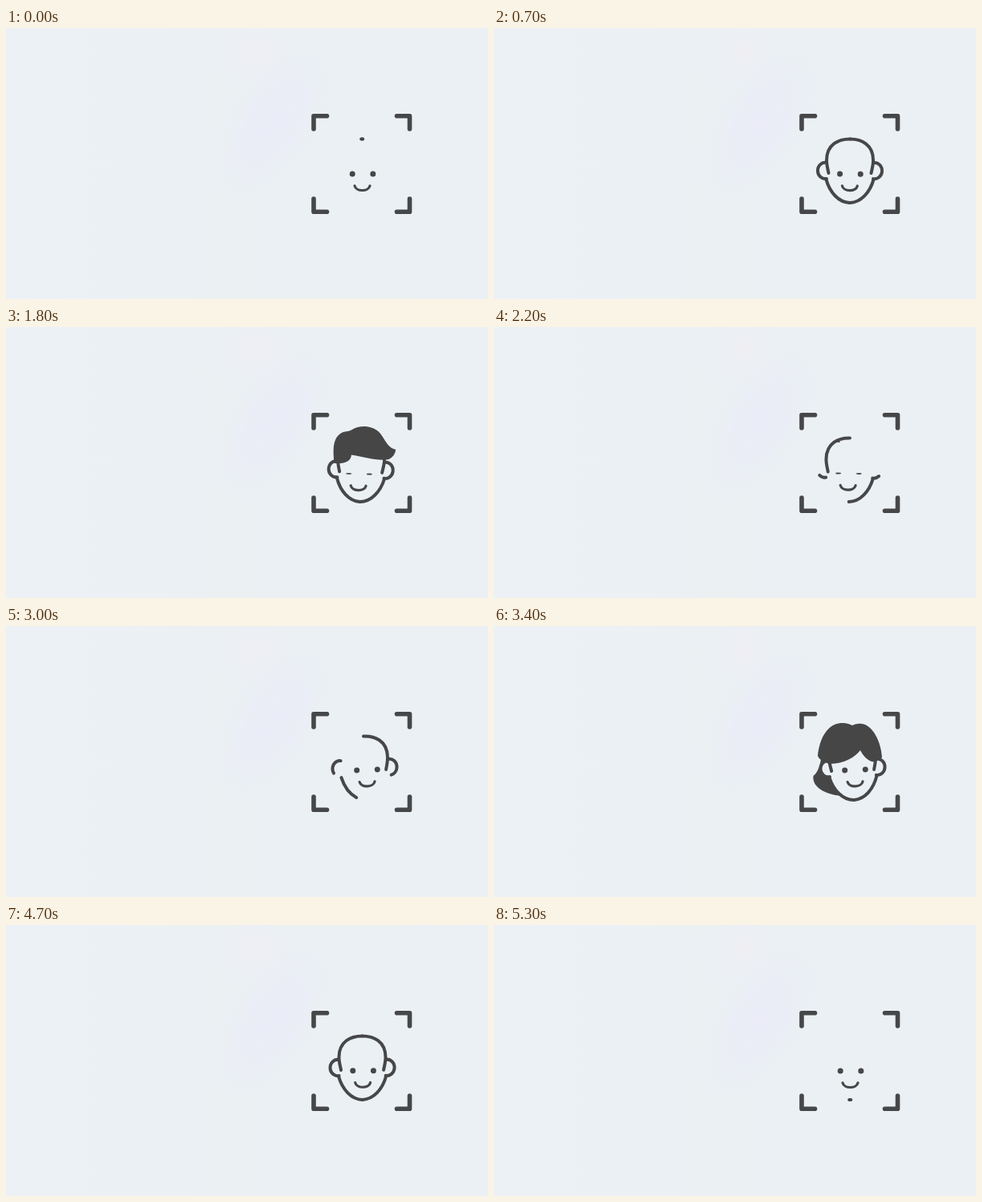
These frames come from a looping animation (600x338 px, 5400 ms). An HTML page:

```html
<!DOCTYPE html>
<html lang="en">
<head>
<meta charset="utf-8">
<title>Face scan</title>
<style>
  html, body { margin: 0; width: 100%; height: 100%; overflow: hidden; background: #ebf0f4; }
  svg { display: block; width: 100%; height: 100%; }
  .line { fill: none; stroke: #464748; stroke-linecap: round; stroke-linejoin: round; }
  .ink { fill: #464647; }
  .skin { fill: #ebf0f5; }
</style>
</head>
<body>
<svg viewBox="0 0 600 338">
  <defs>
    <linearGradient id="base" x1="0" y1="0" x2="1" y2="0">
      <stop offset="0" stop-color="#ebf1f5"/>
      <stop offset=".45" stop-color="#ebf0f3"/>
      <stop offset="1" stop-color="#ebf0f4"/>
    </linearGradient>
    <radialGradient id="lilac">
      <stop offset="0" stop-color="#ebecf8"/>
      <stop offset=".5" stop-color="#ebedf7" stop-opacity=".8"/>
      <stop offset="1" stop-color="#ebf0f5" stop-opacity="0"/>
    </radialGradient>
    <radialGradient id="rose">
      <stop offset="0" stop-color="#efeef3"/>
      <stop offset="1" stop-color="#ebf0f5" stop-opacity="0"/>
    </radialGradient>
  </defs>
  <rect width="600" height="338" fill="url(#base)"/>
  <ellipse cx="310" cy="28" rx="60" ry="60" fill="url(#rose)"/>
  <ellipse cx="332" cy="118" rx="115" ry="58" transform="rotate(-58 332 118)" fill="url(#lilac)"/>

  <path class="line" stroke-width="5.6" d="M383 126V109.8H399.5M486.5 109.8H502.5V126M383 213V229.2H399.5M486.5 229.2H502.5V213"/>

  <g id="locks">
    <path id="lockL" class="ink" d="M404 150C401 168 400 180 390 187C388 200 405 210 432 212L440 170Z"/>
    <path id="lockR" class="ink" d="M483 150C486 170 490 181 501 187C501 200 485 209 462 212L450 170Z"/>
  </g>
  <g id="head"></g>
  <path id="crop" class="ink" d="M408 171C406 152 406 137 419 131C424 129 427 130 430 128C441 121 456 122 465 130C473 138 476 151 487 153C487 158 483 164 477 166C462 168 445 162 430 160C430 167 423 172 408 171Z"/>
  <path id="bob" class="ink" d="M403 162C405 142 414 122 432 121C438 120.5 443 122 446 124C450 122 454 121.5 458 122C472 124 482 145 483 164C480 167 474 170 470 169C464 167 459 161 456 155C450 163 436 172 418 172C411 170 405 167 403 162Z"/>
  <g id="face">
    <ellipse id="eyeL" class="ink" cx="431.2" cy="182" rx="3.5"/>
    <ellipse id="eyeR" class="ink" cx="456.8" cy="182" rx="3.5"/>
    <path class="line" stroke-width="3.2" d="M434 196.8C436 204.4 451 204.4 453 196.8"/>
  </g>
</svg>
<script>
const LOOP = 5400, STEP = 100;
const $ = id => document.getElementById(id);

// Right half of the head around x = 0; the left half is its mirror.
const SHAPES = {
  arc: "M0 138.5C14 138.5 29 145 29 165C29.2 170 27.5 176 26.5 181",
  ear: "M29.5 168C35 167 40.5 172 40 179C39.5 185 34 189 29 188",
  jaw: "M29.5 189C25 205 14 217.5 0 218"
};
const SKIN = "M0 138.5C14 138.5 29 145 29 165L29.5 168C35 167 40.5 172 40 179C39.5 185 34 189 29 188C25 205 14 217.5 0 218Z";

// [time, value] keys, eased in and out between neighbours
const KEYS = {
  man: [[600, 0], [1050, 1], [2000, 1], [2450, 0]],
  woman: [[2450, 0], [2950, 1], [4300, 1], [4800, 0]],
  lid: [[900, 1], [1100, .28], [2200, .28], [2400, 1]],
  crop: [[650, 0], [1000, .95], [1100, 1], [1200, 1.02], [1300, 1], [1750, 1], [2200, .08], [2290, 0]],
  bob: [[3000, 0], [3300, 1.01], [3400, 1], [4270, 1], [4700, 0]],
  lockL: [[3100, .4], [3300, .7], [3400, .85], [3500, 1.1], [3600, 1.08], [3800, 1]],
  lockR: [[3400, .4], [3500, .6], [3600, .9], [3700, 1.02], [3800, 1]]
};

// Per stroke: three passes of [draw from, draw to, erase from, erase to]
const intro = { arc: [-25, 300], ear: [250, 450], jaw: [350, 600] };
const outro = { arc: [4800, 5050], ear: [4950, 5150], jaw: [5050, 5325] };
const swap = {
  arcR: [1900, 2200, 2600, 2900], arcL: [2200, 2400, 3000, 3250],
  earR: [2000, 2300, 2700, 3080], earL: [2000, 2300, 2740, 3170],
  jawR: [2200, 2400, 3000, 3250], jawL: [1900, 2200, 2720, 3150]
};

const smooth = u => u * u * (3 - 2 * u);
const ramp = (t, [a, b]) => smooth(Math.min(1, Math.max(0, (t - a) / (b - a))));

function track(t, keys) {
  if (t <= keys[0][0]) return keys[0][1];
  for (let i = 1; i < keys.length; i++) {
    const [a, v] = keys[i - 1], [b, w] = keys[i];
    if (t <= b) return v + (w - v) * ramp(t, [a, b]);
  }
  return keys[keys.length - 1][1];
}

function addPath(d, side, cls) {
  const p = document.createElementNS("http://www.w3.org/2000/svg", "path");
  p.setAttribute("d", d);
  p.setAttribute("class", cls);
  p.setAttribute("transform", `translate(443.2 0) scale(${side} 1)`);
  $("head").append(p);
  return p;
}

const sides = [["R", 1], ["L", -1]];
const skins = sides.map(([, s]) => addPath(SKIN, s, "skin"));
const strokes = [];
for (const part in SHAPES) for (const [name, s] of sides) {
  const el = addPath(SHAPES[part], s, "line");
  el.setAttribute("stroke-width", 4);
  el.setAttribute("pathLength", 1);
  strokes.push({ el, part, swap: swap[part + name] });
}

function trim(el, from, to) {
  const len = to - from;
  el.style.visibility = len > .001 ? "visible" : "hidden";
  el.setAttribute("stroke-dasharray", `${Math.max(len, .001)} 3`);
  el.setAttribute("stroke-dashoffset", -from);
}

function scaleAt(id, x, y, sx, sy = sx) {
  const el = $(id);
  el.setAttribute("transform", `translate(${x} ${y}) scale(${sx} ${sy}) translate(${-x} ${-y})`);
  el.style.visibility = sx > .01 ? "visible" : "hidden";
}

function draw(t) {
  const v = {};
  for (const k in KEYS) v[k] = track(t, KEYS[k]);
  const { man, woman } = v;

  for (const { el, part, swap: [a, b, c, d] } of strokes) {
    if (t < 1800) trim(el, 0, ramp(t, intro[part]));
    else if (t < 2500) trim(el, ramp(t, [a, b]), 1);
    else if (t < 4500) trim(el, 0, ramp(t, [c, d]));
    else trim(el, ramp(t, outro[part]), 1);
  }

  const turn = 1.5 * man - 2.2 * woman;
  $("head").setAttribute("transform",
    `translate(${-1.5 * man + 3.3 * woman} ${-woman}) rotate(${turn} 443 178)`);
  $("face").setAttribute("transform",
    `translate(${-4.6 * man + 5.6 * woman} ${1.2 * man - 2.6 * woman}) rotate(${turn} 444 185)`);
  for (const id of ["eyeL", "eyeR"]) $(id).setAttribute("ry", 3.5 * v.lid);

  scaleAt("crop", 426, 142, v.crop);
  scaleAt("bob", 446, 140, v.bob);
  scaleAt("locks", 446, 140, v.bob);
  scaleAt("lockL", 440, 180, v.lockL, 1);
  scaleAt("lockR", 448, 180, v.lockR, 1);
  // children must follow the hidden state of the whole hair
  for (const id of ["lockL", "lockR"]) $(id).style.visibility = "inherit";
  for (const s of skins) s.style.visibility = v.bob > .01 ? "visible" : "hidden";
}

const start = performance.now();
function tick() {
  const t = (performance.now() - start) % LOOP;
  draw(Math.floor(t / STEP) * STEP);
  requestAnimationFrame(tick);
}
tick();
</script>
</body>
</html>
```
